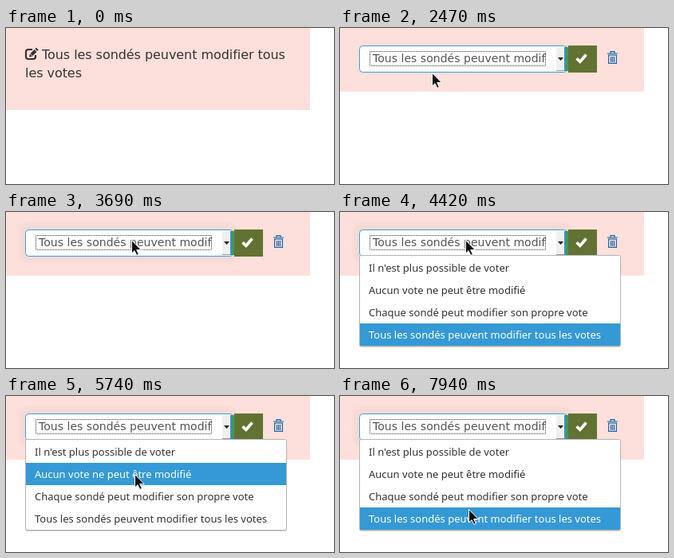
Write an HTML page that moves like this. It is 411 by 196 pixels and loops after 8 s.

```html
<!DOCTYPE html>
<html lang="fr">
<head>
<meta charset="utf-8">
<style>
  html, body { margin: 0; width: 411px; height: 196px; overflow: hidden; background: #fff; }
  svg { display: block; }
  text { font: 16px "DejaVu Sans", sans-serif; fill: #333; white-space: pre; }
  #label text { letter-spacing: -.055px; }
  #form text { font-size: 14px; fill: #555; letter-spacing: .03px; }
  #menu text { font: 13px "Noto Sans", sans-serif; }
  #menu text.active { fill: #fff; }
</style>
</head>
<body>
<svg width="411" height="196" viewBox="0 0 411 196">
  <defs>
    <filter id="blur" x="-20%" y="-80%" width="140%" height="260%"><feGaussianBlur stdDeviation="2"/></filter>
    <clipPath id="field"><rect x="38" y="24" width="220" height="30"/></clipPath>
    <g id="pen" stroke-width="4">
      <path d="M3 9 8 4M8.8 3.2 10.3 1.7"/>
      <path d="M0 12 1 8 4 11Z" stroke="none"/>
    </g>
    <path id="caret" d="M-3.5-8H-1.5L0-7 1.5-8H3.5M0-7V7M-3.5 8H-1.5L0 7 1.5 8H3.5" fill="none"/>
  </defs>
  <rect id="panel" width="381" height="103" fill="#fddfdb"/>

  <g id="label">
    <path d="M33 27H28Q25 27 25 30V36Q25 39 28 39H34Q37 39 37 36V34" fill="none" stroke="#333" stroke-width="2.2"/>
    <use href="#pen" x="29" y="24.5" fill="#333" stroke="#333"/>
    <text x="45" y="39">Tous les sondés peuvent modifier tous</text>
    <text x="24" y="62">les votes</text>
    <use id="pencil" href="#pen" x="110" y="51" fill="#0f62a6" stroke="#0f62a6"/>
  </g>

  <g id="form">
    <rect id="glow" x="17" y="14" width="273" height="49" rx="10" fill="#f5d9d5" filter="url(#blur)"/>
    <rect x="286" y="22" width="36" height="34" fill="#627233"/>
    <rect x="24.5" y="22.5" width="260" height="33" rx="4" fill="#fff" stroke="#3a9fd6"/>
    <rect x="271" y="24" width="10" height="29" fill="#f1f0ef"/>
    <rect x="271" y="53" width="11" height="1" fill="#999"/>
    <rect x="281" y="24" width="2" height="30" fill="#3a8fc4"/>
    <rect x="283" y="24" width="3" height="30" fill="#3c9a58"/>
    <path d="M273 37H280L276.5 41Z" fill="#222"/>
    <rect x="37.5" y="29.5" width="220" height="18" fill="none" stroke="#333" stroke-dasharray="1" stroke-dashoffset=".5"/>
    <text x="41" y="43" clip-path="url(#field)">Tous les sondés peuvent modifier</text>
    <path d="M296.5 38.2 300.8 42.3 308.5 33.5" fill="none" stroke="#fff" stroke-width="3.6"/>
    <g fill="none" stroke="#1768a8" stroke-width="1.2">
      <path d="M335 32H348M339 31.5V29.6H344V31.5M339.5 36V43M341.5 36V43M343.5 36V43"/>
      <rect x="336.6" y="34" width="9.8" height="10.4"/>
    </g>
  </g>

  <g id="menu">
    <rect x="24" y="56" width="328" height="114" rx="3" fill="#0003"/>
    <rect x="24.5" y="54.5" width="327" height="114" rx="2" fill="#fff" stroke="#b4b4b4"/>
    <rect id="highlight" x="25" width="326" height="28" fill="#3499d5"/>
  </g>

  <g id="arrow"><path d="M-.5.5V17L3 13.7 5.8 19.4 8.4 18.2 5.7 12.6H11.2Z" fill="#111" stroke="#fff"/></g>
  <g id="beam">
    <use href="#caret" stroke="#fff" stroke-width="3"/>
    <use href="#caret" stroke="#111" stroke-width="1.2"/>
  </g>
  <g id="hand"><path d="M-1 9V1Q0-1 2 1V6L11 8V13L9 17H1L-4 10Z" fill="#111" stroke="#fff" stroke-linejoin="round"/></g>
</svg>
<script>
const LOOP = 8000, TICK = 50;
const ROW = 28, MENU_TOP = 56;
const EDIT_AT = 2470, MENU_AT = 4420;
const el = id => document.getElementById(id);
const show = (id, on) => { el(id).style.display = on ? '' : 'none'; };

const items = [
  "Il n'est plus possible de voter",
  'Aucun vote ne peut être modifié',
  'Chaque sondé peut modifier son propre vote',
  'Tous les sondés peuvent modifier tous les votes'
].map((label, i) => {
  const text = document.createElementNS('http://www.w3.org/2000/svg', 'text');
  text.setAttribute('x', 36);
  text.setAttribute('y', MENU_TOP + ROW * i + 19);
  text.textContent = label;
  return el('menu').appendChild(text);
});

// Each glide starts where the last one ended; sway bends the way there
const glides = [
  { at: 550, ms: 300, x: 93, y: 113, swayX: 121 },
  { at: 1110, ms: 50, x: 90, y: 109 },
  { at: 1300, ms: 200, x: 77, y: 56 },
  { at: 1770, ms: 170, x: 116, y: 56 },
  { at: 2970, ms: 90, x: 133, y: 63 },
  { at: 3220, ms: 470, x: 158, y: 35, swayY: 25 },
  { at: 4880, ms: 370, x: 162, y: 92 },
  { at: 5740, ms: 270, x: 162, y: 126 },
  { at: 7880, ms: 60, x: 162, y: 142 }
];

function pointer(t) {
  let x = -60, y = 157;
  for (const g of glides) {
    if (t < g.at) break;
    const gaps = Math.round(g.ms / TICK);
    const step = Math.min(gaps, Math.floor((t - g.at) / g.ms * gaps + 0.1));
    const s = (step + 1) / (gaps + 1);
    const arc = Math.sin(Math.PI * s);
    x += (g.x - x) * s + (g.swayX || 0) * arc;
    y += (g.y - y) * s + (g.swayY || 0) * arc;
  }
  return [Math.round(x), Math.round(y)];
}

function cursorKind(t, x, y) {
  if (t >= EDIT_AT || y > 103) return 'arrow';
  if (x > 109 && y < 65) return 'hand';
  return x < 96 && y < 66 ? 'beam' : 'arrow';
}

function render(t) {
  const editing = t >= EDIT_AT, open = t >= MENU_AT;
  const [x, y] = pointer(t);
  const kind = cursorKind(t, x, y);
  for (const id of ['arrow', 'beam', 'hand']) show(id, id === kind);
  el(kind).setAttribute('transform', `translate(${x} ${y})`);

  el('panel').setAttribute('height', editing ? 80 : 103);
  show('label', !editing);
  show('pencil', y < 103);
  show('form', editing);
  el('glow').style.opacity = Math.min(1, Math.max(0, (t - EDIT_AT) / 140));
  show('menu', open);

  const active = y < MENU_TOP ? items.length - 1 : Math.floor((y - MENU_TOP) / ROW);
  el('highlight').setAttribute('y', MENU_TOP + ROW * active);
  items.forEach((item, i) => item.classList.toggle('active', i === active));
}

function tick() {
  render(performance.now() % LOOP);
  requestAnimationFrame(tick);
}
tick();
</script>
</body>
</html>
```
